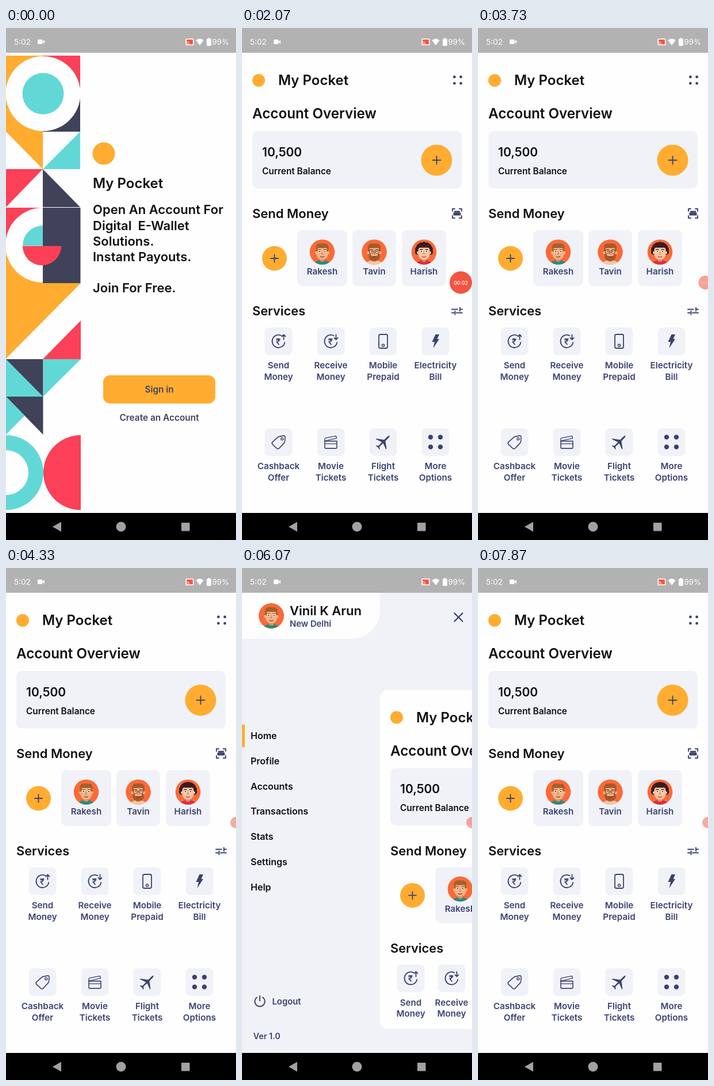
These frames come from a looping animation (400x889 px, 8000 ms). An HTML page with a canvas:

```html
<!DOCTYPE html>
<html lang="en">
<head>
<meta charset="utf-8">
<title>Wallet app</title>
<style>
  html, body { margin: 0; width: 100%; height: 100%; overflow: hidden; background: #000; }
  canvas { display: block; width: 400px; height: 889px; }
</style>
</head>
<body>
<canvas id="stage"></canvas>
<script>
const LOOP = 8000, WIDTH = 400, HEIGHT = 889, TOP = 43, BOTTOM = 842;
const PAPER = '#fefeff', MIST = '#f0f2f8', INK = '#3a4270', BLACK = '#101014';
const AMBER = '#ffac30', RED = '#fb4058', TEAL = '#62d8d6', SLATE = '#40425a';
const APP = 'My Pocket';

const canvas = document.getElementById('stage');
const ctx = canvas.getContext('2d');
const dpr = window.devicePixelRatio || 1;
canvas.width = WIDTH * dpr;
canvas.height = HEIGHT * dpr;

const clamp = (v) => Math.max(0, Math.min(1, v));
const span = (t, a, b) => clamp((t - a) / (b - a));
const mix = (a, b, p) => a + (b - a) * p;
const smooth = (p) => p * p * (3 - 2 * p);

function text(str, x, y, size, color = BLACK, align = 'left', weight = 600) {
  ctx.font = `${weight} ${size}px Inter, "Open Sans", sans-serif`;
  ctx.textAlign = align;
  ctx.fillStyle = color;
  ctx.fillText(str, x, y + size * 0.36);
}

function disc(x, y, r, color, from = 0, to = Math.PI * 2) {
  ctx.beginPath();
  ctx.arc(x, y, r, from, to);
  ctx.fillStyle = color;
  ctx.fill();
}

function box(x, y, w, h, color, r = 0) {
  ctx.beginPath();
  ctx.roundRect(x, y, w, h, r);
  ctx.fillStyle = color;
  ctx.fill();
}

function poly(color, ...pts) {
  ctx.beginPath();
  for (let i = 0; i < pts.length; i += 2) ctx.lineTo(pts[i], pts[i + 1]);
  ctx.closePath();
  ctx.fillStyle = color;
  ctx.fill();
}

function stroke(d, color = INK, width = 1.8) {
  ctx.strokeStyle = color;
  ctx.lineWidth = width;
  ctx.stroke(new Path2D(d));
}

function at(x, y, draw) {
  ctx.save();
  ctx.translate(x, y);
  draw();
  ctx.restore();
}

function plusButton(x, y, r, arm) {
  disc(x, y, r, AMBER);
  at(x, y, () => stroke(`M${-arm} 0H${arm}M0 ${-arm}V${arm}`));
}

function fourDots(x, y, gap, r) {
  for (const i of [-1, 1]) for (const j of [-1, 1]) disc(x + i * gap, y + j * gap, r, INK);
}

// Login page
function pattern() {
  const { PI } = Math;
  box(0, 48, 64, 132, AMBER);
  box(64, 48, 65, 66, RED);
  box(64, 114, 65, 66, SLATE);
  disc(64.5, 114, 65, PAPER);
  disc(64.5, 114, 36, TEAL);

  poly(AMBER, 0, 180, 64, 180, 64, 245);
  poly(TEAL, 129, 180, 129, 245, 64, 245);
  poly(RED, 0, 245, 64, 245, 0, 311);
  poly(SLATE, 64, 245, 64, 311, 129, 311);

  box(0, 312, 64, 66, RED);
  box(0, 377, 64, 66, AMBER);
  box(64, 312, 65.5, 131, SLATE);
  disc(64, 377, 65, PAPER, PI / 2, PI * 1.5);
  ctx.beginPath();
  ctx.moveTo(64, 378);
  ctx.arc(64, 378, 35, PI, PI * 1.5);
  ctx.fillStyle = TEAL;
  ctx.fill();
  disc(62.5, 378.5, 33.5, RED, 0, PI);

  poly(AMBER, 0, 443, 130, 443, 0, 574);
  poly(RED, 130, 508, 130, 575, 64, 575);
  box(0, 575, 64.5, 65, TEAL);
  poly(SLATE, 0, 575, 64.5, 575, 64.5, 640);
  poly(TEAL, 64.5, 575, 130, 575, 64.5, 640);
  poly(SLATE, 0, 640, 64.5, 640, 64.5, 706);
  poly(TEAL, 0, 640, 32.5, 673, 0, 706);

  disc(0, 772, 65, TEAL, -PI / 2, PI / 2);
  disc(0, 772, 39, PAPER, -PI / 2, PI / 2);
  disc(130, 772, 65, RED, PI / 2, PI * 1.5);
}

function login() {
  box(0, 0, WIDTH, BOTTOM, PAPER);
  pattern();
  disc(170, 218, 19.5, AMBER);
  text(APP, 151, 269, 24);
  const lines = ['Open An Account For', 'Digital  E-Wallet', 'Solutions.', 'Instant Payouts.', '', 'Join For Free.'];
  lines.forEach((line, i) => text(line, 151, 315.5 + 27.2 * i, 22));
  box(169, 603, 195, 49, AMBER, 12);
  text('Sign in', 266.5, 627.5, 15.3, SLATE, 'center');
  text('Create an Account', 266.5, 676.5, 15.4, SLATE, 'center');
}

// Avatars, drawn for a radius of 22
const people = [
  { skin: '#f0b488', hair: '#a4602c', shirt: '#2a8a80' },
  { skin: '#f0b084', hair: '#a8582a', shirt: '#f0c9a8', beard: true },
  { skin: '#f3c6a4', hair: '#3a1c20', shirt: '#d8304a', curls: true }
];

function avatar(x, y, r, who) {
  at(x, y, () => {
    ctx.scale(r / 22, r / 22);
    disc(0, 0, 22, '#fa6a38');
    ctx.clip();
    ctx.beginPath();
    ctx.ellipse(0, 23, 15, 9, 0, 0, 7);
    ctx.fillStyle = who.shirt;
    ctx.fill();
    box(-4, 8, 8, 9, '#d8935c', 3);
    if (who.curls) for (let i = 0; i < 9; i++) {
      const a = Math.PI * (0.95 + i * 0.1375);
      disc(Math.cos(a) * 11, Math.sin(a) * 11 - 2, 5, who.hair);
    }
    disc(-10, 1, 2.6, who.skin);
    disc(10, 1, 2.6, who.skin);
    box(-10, -12, 20, 25, who.skin, 9);
    if (who.beard) {
      box(-10, 3, 20, 13, who.hair, [2, 2, 9, 9]);
      box(-6, 2, 12, 5, who.skin, 2);
    }
    if (who.curls) {
      for (let i = -2; i <= 2; i++) disc(i * 4, -11, 3.6, who.hair);
    } else {
      box(-11, -15, 22, 8, who.hair, [8, 8, 2, 2]);
      box(-11, -10, 3, 9, who.hair, 1);
      box(8, -10, 3, 9, who.hair, 1);
    }
    for (const s of [-1, 1]) {
      disc(s * 4.5, -1, 1.9, '#fff');
      disc(s * 4.5, -1, 1.1, '#33261f');
      stroke(`M${s * 2.5} -4.5H${s * 7}`, who.hair, 1.2);
    }
    if (who.beard) stroke('M-8 -3h6v5h-6zM2 -3h6v5h-6zM-2 -1h4', '#6b3a1c', 0.8);
    stroke('M0 0l-1 4h2', '#c47c48', 1);
    stroke('M-3 8q3 2 6 0', who.curls ? '#d8263c' : '#8a3c22', 1.4);
  });
}

// Service icons, each centred on the origin
function coin(arrow) {
  stroke('M5 -9.8A11 11 0 1 0 10.8 2');
  text('₹', -0.5, 0.3, 15, INK, 'center');
  stroke(arrow);
}

const icons = {
  send: () => coin('M9 -3V-11M6 -8.5L9 -11.5L12 -8.5'),
  receive: () => coin('M9 -11.5V-3.5M6 -6L9 -3L12 -6'),
  phone: () => {
    stroke('M-5 -12H5Q7.5 -12 7.5 -9.5V9.5Q7.5 12 5 12H-5Q-7.5 12 -7.5 9.5V-9.5Q-7.5 -12 -5 -12Z');
    stroke('M-2 7a2 2 0 1 0 4 0a2 2 0 1 0 -4 0', INK, 1.5);
  },
  bolt: () => poly(INK, 0, -12, 6.5, -12, 3, -4, 6.5, -4, -4, 12, -1.5, 1, -6, 1),
  tag: () => {
    stroke('M1.5 -9.5L9 -11Q11.5 -11.3 11.5 -8.5L11 -1Q10.8 .5 9.5 2L1 11Q-1 12.8 -3 11L-10.5 4Q-12.3 2 -10.5 0L-1.5 -8Q0 -9.3 1.5 -9.5Z', INK, 1.6);
    stroke('M4.3 -5.5a2 2 0 1 0 4 0a2 2 0 1 0 -4 0', INK, 1.4);
  },
  film: () => {
    stroke('M-10.5 -1.5H10.5V9Q10.5 11 8.5 11H-8.5Q-10.5 11 -10.5 9Z', INK, 1.6);
    stroke('M-10.5 -1.5V-5Q-10.5 -6.5 -9 -7L9 -10.5L10 -6.5L-10 -2M-10 3H10', INK, 1.4);
  },
  plane: () => {
    ctx.rotate(Math.PI / 4);
    poly(INK, 0, -16, 1.5, -13, 1.5, -4, 12.5, 4, 12.5, 5.5, 1.5, 1.5, 1, 10, 4.5, 13, 4.5, 14,
      0, 13, -4.5, 14, -4.5, 13, -1, 10, -1.5, 1.5, -12.5, 5.5, -12.5, 4, -1.5, -4, -1.5, -13);
  },
  more: () => fourDots(0, 0, 8.5, 4.2)
};

const services = [
  ['send', 'Send', 'Money'], ['receive', 'Receive', 'Money'],
  ['phone', 'Mobile', 'Prepaid'], ['bolt', 'Electricity', 'Bill'],
  ['tag', 'Cashback', 'Offer'], ['film', 'Movie', 'Tickets'],
  ['plane', 'Flight', 'Tickets'], ['more', 'More', 'Options']
];
const contacts = [['Rakesh', 96, 87], ['Tavin', 192, 76], ['Harish', 278, 77]];

function home(w, h, radius = 0) {
  ctx.save();
  ctx.beginPath();
  ctx.roundRect(0, TOP, w, h, radius);
  ctx.clip();
  box(0, TOP, w, h, PAPER);
  disc(29, 91, 11, AMBER);
  text(APP, 63, 90.5, 24);
  fourDots(w - 25, 90.5, 5.6, 2.4);
  text('Account Overview', 18, 148.5, 24.2);

  box(18, 179, w - 36, 99.5, MIST, 9);
  text('10,500', 35, 215, 21);
  text('Current Balance', 35, 248.5, 15.4);
  plusButton(w - 61.5, 229.5, 27, 7);

  text('Send Money', 18, 322.5, 22);
  at(w - 26, 322, () => {
    stroke('M-8 -4V-8H-4M4 -8H8V-4M8 4V8H4M-4 8H-8V4', INK, 1.9);
    box(-5, -4.5, 10, 3, INK);
    box(-6.5, -1.5, 13, 5, INK, 1);
  });
  plusButton(56.5, 400, 21.5, 6.5);
  contacts.forEach(([name, x, width], i) => {
    box(x, 351, width, 97, MIST, 9);
    avatar(x + width / 2, 389, 21.8, people[i]);
    text(name, x + width / 2, 423, 15.2, INK, 'center');
  });

  text('Services', 18, 491.5, 21.8);
  at(w - 26, 491.5, () => stroke('M-9 -3H1M5 -3H9M5 -6V0M-9 3H-5M-1 3H9M-3.5 0V6', INK, 1.9));
  const cell = (w - 36) / 4;
  services.forEach(([icon, first, second], i) => {
    const x = 18 + cell * (i % 4 + 0.5);
    const y = 544 + (i > 3 ? cell * 1.922 : 0);
    box(x - 24, y - 24, 48, 48, MIST, 8);
    at(x, y, icons[icon]);
    text(first, x, y + 42, 15.2, INK, 'center');
    text(second, x, y + 61.5, 15.2, INK, 'center');
  });
  ctx.restore();
}

function sidebar(showClose) {
  box(0, TOP, WIDTH, BOTTOM - TOP, MIST);
  box(0, TOP, 240, 80, PAPER, [0, 0, 50, 0]);
  avatar(51, 83, 22, people[0]);
  text('Vinil K Arun', 83, 74, 22);
  text('New Delhi', 83, 96.5, 14.8, INK);
  box(0, 272, 5, 39, AMBER);
  ['Home', 'Profile', 'Accounts', 'Transactions', 'Stats', 'Settings', 'Help']
    .forEach((item, i) => text(item, 15, 291.3 + 43.75 * i, 16));
  at(31, 752.5, () => stroke('M-5 -7A8.7 8.7 0 1 0 5 -7M0 -9.5V-1', INK, 1.9));
  text('Logout', 52.5, 752.5, 14.8, INK);
  text('Ver 1.0', 19.5, 812.5, 14.4, INK);
  if (showClose) at(376.5, 85.5, () => stroke('M-7 -7L7 7M7 -7L-7 7', INK, 2.3));
}

// Sidebar open and close: the page slides, shrinks and swings back from a tilt
function drawer(t) {
  const closing = t >= 7530;
  const p = closing ? 1 - span(t, 7580, 7850) : span(t, 5720, 6010);
  const swing = closing ? span(t, 7590, 7850) : span(t, 5800, 6050);
  const tilted = !closing || t > 7585;
  const w = mix(WIDTH, WIDTH * 0.8, p), h = mix(BOTTOM, BOTTOM * 0.7, p);
  const cx = w / 2, cy = TOP + h / 2;
  sidebar(!closing);
  ctx.save();
  ctx.translate(WIDTH * 0.6 * p + cx, BOTTOM * 0.2 * p + cy);
  if (tilted) ctx.rotate(-Math.PI / 10 * (1 - swing));
  ctx.translate(-cx, -cy);
  home(w, h, closing ? 0 : 14);
  ctx.restore();
}

function zoomed(scale, draw) {
  at(WIDTH / 2, HEIGHT / 2, () => {
    ctx.scale(scale, scale);
    ctx.translate(-WIDTH / 2, -HEIGHT / 2);
    draw();
  });
}

// Login to home: quick fade and a zoom that settles slowly
function pageChange(t) {
  const u = span(t, 1030, 1330);
  const p = 1 - (1 - u) ** 4;
  zoomed(1 + 0.05 * p, login);
  ctx.globalAlpha = 0.6 * span(u, 0.2, 0.42);
  box(0, 0, WIDTH, HEIGHT, '#000');
  ctx.globalAlpha = span(u, 0.1, 0.25);
  zoomed(0.85 + 0.15 * p, () => {
    box(0, 0, WIDTH, TOP, PAPER);
    home(WIDTH, BOTTOM - TOP);
  });
  ctx.globalAlpha = 1;
}

function systemBars() {
  box(0, 0, WIDTH, TOP, 'rgba(0, 0, 0, 0.3)');
  text('5:02', 14, 24.5, 13.6, '#fff', 'left', 400);
  box(55, 20, 8.5, 8, '#fff', 1.5);
  poly('#fff', 63, 24, 67, 20.8, 67, 27.2);
  box(312.5, 18.5, 14, 11.5, '#fff', 1);
  box(314, 20, 11, 8.5, '#ee5a48');
  stroke('M314 23.5a5 5 0 0 1 5 5M314 26a2.5 2.5 0 0 1 2.5 2.5', '#fff', 1);
  poly('#fff', 330.5, 21.5, 333.5, 19.2, 337, 18.4, 340.5, 19.2, 343.5, 21.5, 337, 30);
  box(349, 19, 8, 12, '#fff', 1);
  box(351, 17.5, 4, 2, '#fff');
  text('99%', 358.5, 24.5, 13.4, '#fff', 'left', 400);

  const key = '#a2a2a2';
  box(0, BOTTOM, WIDTH, HEIGHT - BOTTOM, '#000');
  poly(key, 81, 866, 96, 857.5, 96, 874.5);
  disc(200, 866, 8.5, key);
  box(305, 859, 14.5, 14.5, key, 1);
}

// Floating timer that docks at the right edge and then tucks away
function timer(t) {
  if (t < 70) return;
  const enter = smooth(span(t, 70, 270));
  const dock = smooth(span(t, 2070, 2330));
  const hide = smooth(span(t, 3270, 4070));
  const x = mix(mix(mix(420, 380.5, enter), 388.5, dock), 400, hide);
  const r = mix(mix(19.5, 15.5, dock), 10, hide);
  ctx.globalAlpha = mix(mix(1, 0.62, dock), 0.5, hide);
  disc(x, 442, r, '#f25540');
  ctx.globalAlpha = 1 - hide;
  const sec = Math.floor((t - 70) / 1000);
  if (hide < 1) text('00:0' + sec, x, 442.5, r * 0.44, '#fff', 'center', 500);
  ctx.globalAlpha = 1;
}

function draw(t) {
  ctx.setTransform(dpr, 0, 0, dpr, 0, 0);
  ctx.lineCap = 'round';
  ctx.lineJoin = 'round';
  box(0, 0, WIDTH, HEIGHT, PAPER);
  if (t < 1030) login();
  else if (t < 1330) pageChange(t);
  else if (t >= 5720 && t < 7850) drawer(t);
  else home(WIDTH, BOTTOM - TOP);
  systemBars();
  timer(t);
}

const start = performance.now();
function frame() {
  draw((performance.now() - start) % LOOP);
  requestAnimationFrame(frame);
}
frame();
</script>
</body>
</html>
```
